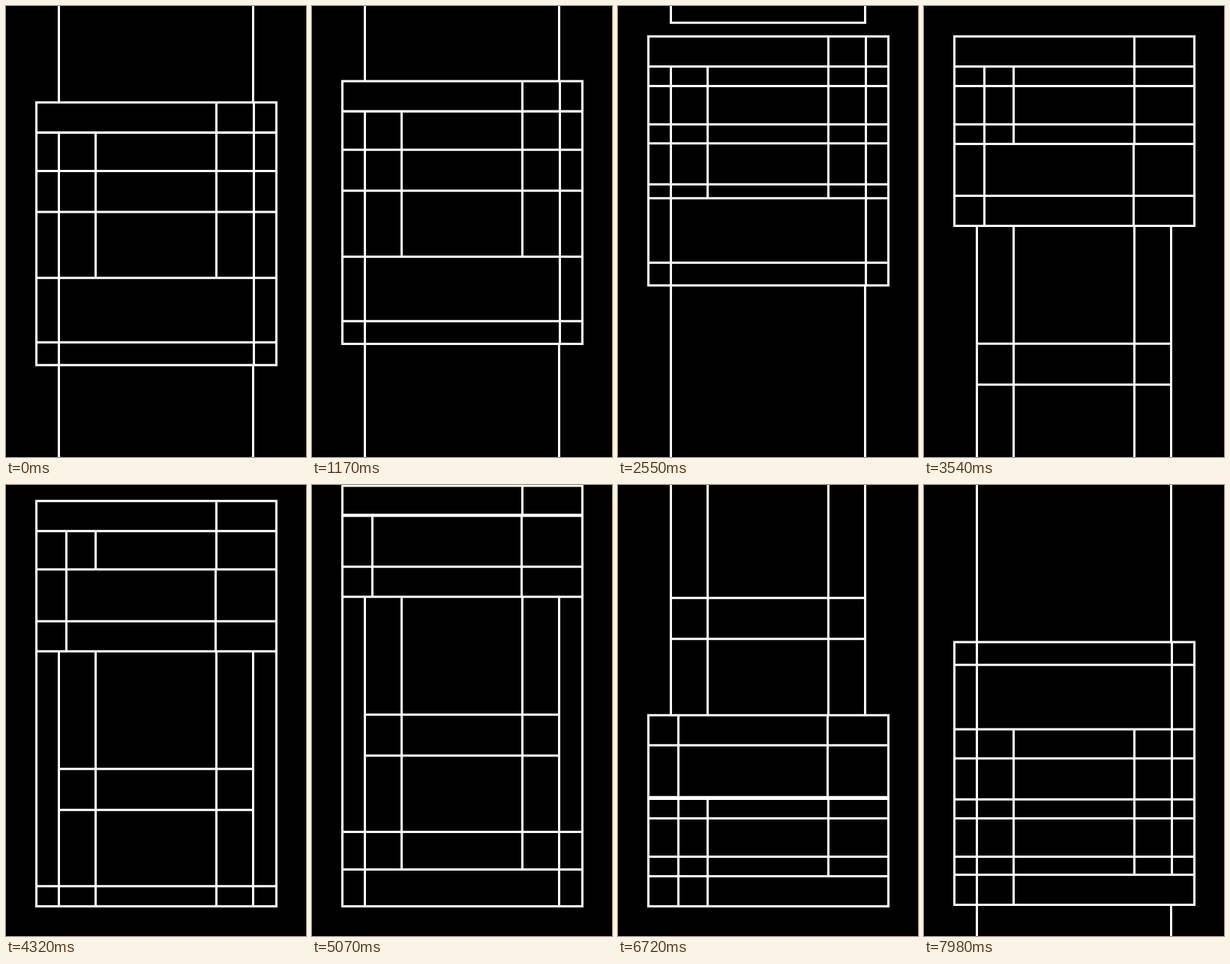
Write an HTML page that moves like this. It is 400 px wide and 600 px high and loops after 8 s.

```html
<!DOCTYPE html>
<html lang="en">
<head>
<meta charset="utf-8">
<title>Sliding outlines</title>
<style>
  html, body { margin: 0; width: 100%; height: 100%; overflow: hidden; background: #000; }
  svg { display: block; width: 100vw; height: 100vh; }
  path { fill: none; stroke: #fff; stroke-width: 3; stroke-linecap: square; }
</style>
</head>
<body>
<svg viewBox="0 0 400 600"><path id="lines"/></svg>
<script>
const LOOP = 8000, STEP = 30;
const SPAN = 667;               // scroll distance of the whole passage
const SWAP = 126;               // scroll at which the letters change
const TOP = 40.5, BOTTOM = 560.5;
const L = 40.5, R = 360.5, IN_L = 70.5, IN_R = 330.5, LEG_R = 329.5;
const STEM_L = 119.5, STEM_R = 280.5;
const { min, max, sin } = Math;
const path = document.getElementById('lines');

// Sine ease-in-out, already under way at t = 0.
const scrollAt = s => 334.8 * (0.9967 + sin(0.2909 * (s - 5.12)));

function build(scroll) {
  // The second half is the first one run backwards and upside down.
  const flip = scroll > SPAN / 2;
  const d = flip ? SPAN - scroll : scroll;
  const fy = y => flip ? 601 - y : y;
  const out = [];
  const seg = (x1, y1, x2, y2) =>
    out.push(`M${x1} ${fy(y1).toFixed(2)}L${x2} ${fy(y2).toFixed(2)}`);
  const row = (y, a = L, b = R) => seg(a, y, b, y);
  const col = (x, a, b) => { if (b > a) seg(x, a, x, b); };
  const cols = (xs, a, b) => xs.forEach(x => col(x, a, b));
  const rows = ys => ys.forEach(y => row(y));

  const base = 477.7 - d;

  // The end strip of the S shows the lines of one side only.
  const stripCols = (leftXs, rightXs, top, strip, end) => {
    cols(leftXs, flip ? top : strip, end);
    cols(rightXs, flip ? strip : top, end);
  };

  function firstSet() {
    const flow = 128.3 - d;
    const top = max(TOP, flow), strip = top + 40;
    const mid = max(106.5, 168.5 - d);
    const bar = max(182.8, 219.5 - d);
    const bowl = max(bar + 54.5, 361.7 - d);
    rows([top, strip, mid, mid + 51, bar, bar + 54.5, bowl, 447.6 - d, base]);
    cols([L, R], top, base);
    stripCols([IN_L], [IN_R], top, strip, base);
    stripCols([STEM_L], [STEM_R], top, strip, bowl);
    cols([IN_L, LEG_R], -5, flow);
    row(flow, IN_L, LEG_R);
    cols([IN_L, LEG_R], base, 606);
  }

  function secondSet() {
    const bowl = base - 109;
    const top = max(1, min(TOP, bowl - 91)), strip = top + 40;
    const mid = max(strip, min(106.5, bowl - 51));
    const low = max(strip, min(157.5, bowl));
    rows([top, strip, mid, low, min(183.5, bowl), bowl, base - 40, base]);
    cols([L, R], top, base);
    stripCols([80.5], [], top, strip, base);
    stripCols([STEM_L], [STEM_R], top, strip, bowl);
    col(279.5, bowl, base);

    // Tall letter between the two stacks
    const next = 790.3 - d;
    const pinned = next < BOTTOM;
    const end = pinned ? BOTTOM : next;
    cols([IN_L, LEG_R], base, end);
    cols([STEM_L, STEM_R], base, pinned ? min(BOTTOM, next + 50) : end);
    for (const y of [634.3, 688.8]) row(fy(y - scroll), IN_L, LEG_R);
    if (pinned) {
      cols([L, R], base, BOTTOM);
      rows([next, min(BOTTOM, next + 50), BOTTOM]);
    } else {
      row(next, IN_L, LEG_R);
    }
  }

  (d < SWAP ? firstSet : secondSet)();
  return out.join('');
}

function frame(now) {
  const t = now % LOOP;
  path.setAttribute('d', build(scrollAt((t - t % STEP) / 1000)));
  requestAnimationFrame(frame);
}
frame(0);
</script>
</body>
</html>
```
